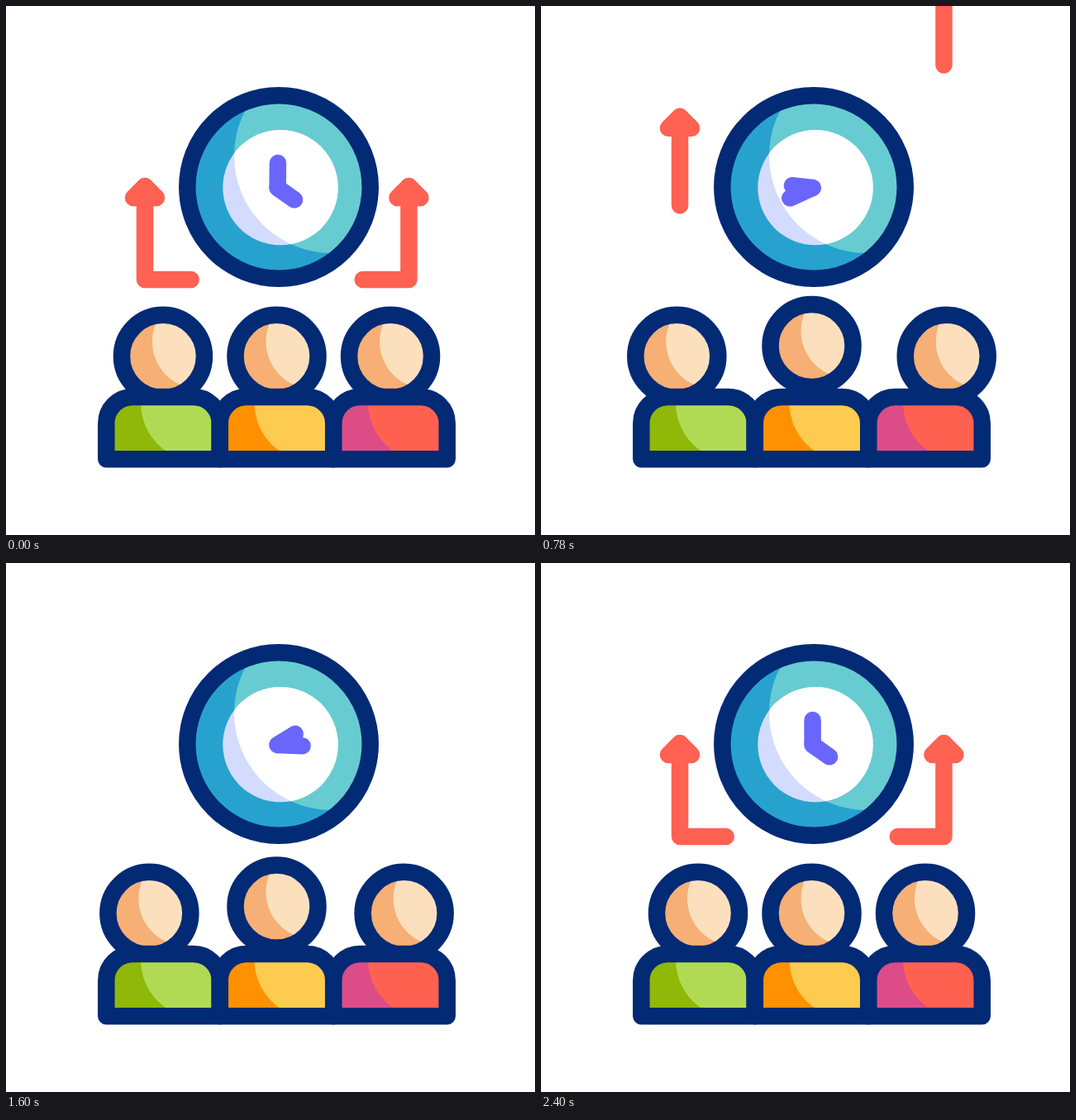
An HTML page for the animation above (2620 ms loop, 640 px wide and 640 px high).

```html
<!DOCTYPE html>
<html lang="en">
<head>
<meta charset="utf-8">
<title>Team time</title>
<style>
  html, body { margin: 0; width: 100%; height: 100%; overflow: hidden; background: #fff; }
  svg { display: block; width: 100%; height: 100%; }
  .line { fill: none; stroke: #032a75; stroke-width: 20.5; stroke-linejoin: round; }
  .hand, .arrow { fill: none; stroke: #6a66fb; stroke-width: 20.5; stroke-linecap: round; stroke-linejoin: round; }
  .arrow { stroke: #ff6152; }
</style>
</head>
<body>
<svg viewBox="0 0 640 640">
  <defs>
    <clipPath id="dialClip"><circle cx="330" cy="219" r="110"/></clipPath>
    <clipPath id="faceClip"><circle cx="332" cy="219.6" r="69.7"/></clipPath>
    <clipPath id="headClip"><circle r="48"/></clipPath>
    <path id="torso" d="M121.3 548.2V505a32 32 0 0 1 32-32h73.4a32 32 0 0 1 32 32v43.2z"/>
    <clipPath id="torsoClip"><use href="#torso"/></clipPath>
  </defs>

  <g id="arrows"></g>

  <circle cx="330" cy="219" r="110" fill="#27a2ce"/>
  <circle cx="394" cy="181" r="118" fill="#67ccd1" clip-path="url(#dialClip)"/>
  <circle cx="332" cy="219.6" r="69.7" fill="#d3dcfe"/>
  <circle cx="394" cy="181" r="118" fill="#fff" clip-path="url(#faceClip)"/>
  <circle cx="330" cy="219" r="110.7" class="line"/>
  <path id="minute" class="hand" d="M328.6 220V190"/>
  <path id="hour" class="hand" d="M328.6 220L349 234.3"/>

  <g id="people"></g>
</svg>
<script>
const LOOP = 2620, TURN = 2400;
const $ = id => document.getElementById(id);

const progress = (t, start, length) => Math.min(1, Math.max(0, (t - start) / length));
const smooth = p => p * p * (3 - 2 * p);

// Cubic Bezier (1/6, 1/6, 2/3, 1): steady start, soft landing
function settle(p) {
  const curve = (s, a, b) => 3 * (1 - s) ** 2 * s * a + 3 * (1 - s) * s * s * b + s ** 3;
  let low = 0, high = 1;
  for (let i = 0; i < 24; i++) {
    const mid = (low + high) / 2;
    if (curve(mid, 1 / 6, 2 / 3) < p) low = mid; else high = mid;
  }
  return curve(low, 1 / 6, 1);
}

const people = [
  { x: 190, dx: -25.7, dy: 0, dark: '#8fb808', light: '#b1da54' },
  { x: 327.5, dx: 0, dy: -12.8, dark: '#ff9100', light: '#fdcb50' },
  { x: 465, dx: 25.7, dy: 0, dark: '#dc4c87', light: '#ff6151' },
];
$('people').innerHTML = people.map(() => `
  <g class="head">
    <circle r="48" fill="#f6af75"/>
    <circle cx="44" cy="-17.7" r="57" fill="#fce0be" clip-path="url(#headClip)"/>
    <circle r="50" class="line"/>
  </g>`).join('') + people.map(p => `
  <g transform="translate(${p.x - 190})">
    <use href="#torso" fill="${p.dark}"/>
    <circle cx="234" cy="480" r="71" fill="${p.light}" clip-path="url(#torsoClip)"/>
    <use href="#torso" class="line"/>
  </g>`).join('');
const heads = document.querySelectorAll('.head');

const arrows = [
  { start: 400, place: '' },
  { start: 0, place: 'translate(655.4) scale(-1 1)' },
];
$('arrows').innerHTML = arrows.map(a => `
  <g transform="${a.place}"><g class="arrow"><path/><path d="M-14 14L0 0L14 14z"/></g></g>`).join('');
const arrowGroups = document.querySelectorAll('.arrow');

// Arrow route: from the tail along the floor, then up the shaft
const FLOOR = 55.7, ROUTE = FLOOR + 113;
const pointAt = d => d < FLOOR ? [223.7 - d, 331] : [168, 331 - (d - FLOOR)];

function drawArrow(group, from, to, lift, size) {
  const [line, tip] = group.children;
  const end = pointAt(to);
  const corner = from < FLOOR && to > FLOOR ? 'L168 331' : '';
  line.setAttribute('d', `M${pointAt(from)}${corner}L${end}`);
  tip.setAttribute('transform', `translate(${end}) rotate(${to < FLOOR ? -90 : 0}) scale(${size})`);
  group.setAttribute('transform', `translate(0 ${-lift})`);
}

function render(t) {
  const turn = settle(progress(t, 0, TURN)) * 360;
  $('minute').setAttribute('transform', `rotate(${turn * 4} 328.6 220)`);
  $('hour').setAttribute('transform', `rotate(${turn} 328.6 220)`);

  const away = settle(progress(t, 0, 600)) - smooth(progress(t, 1200, 1000));
  people.forEach((p, i) => heads[i].setAttribute('transform',
    `translate(${p.x + p.dx * away} ${423.8 + p.dy * away})`));

  arrows.forEach(({ start }, i) => {
    const group = arrowGroups[i];
    const regrow = smooth(progress(t, 2000, 400));
    const leaving = t < start + 1200;
    group.style.display = leaving || regrow > 0 ? '' : 'none';
    if (leaving) {
      const trim = 61.2 * smooth(progress(t, start, 200));
      drawArrow(group, trim, ROUTE, 353 * smooth(progress(t, start, 1200)), 1);
    } else {
      drawArrow(group, 0, ROUTE * regrow, 0, Math.min(1, regrow * 3));
    }
  });
}

function tick() {
  render(performance.now() % LOOP);
  requestAnimationFrame(tick);
}
tick();
</script>
</body>
</html>
```
